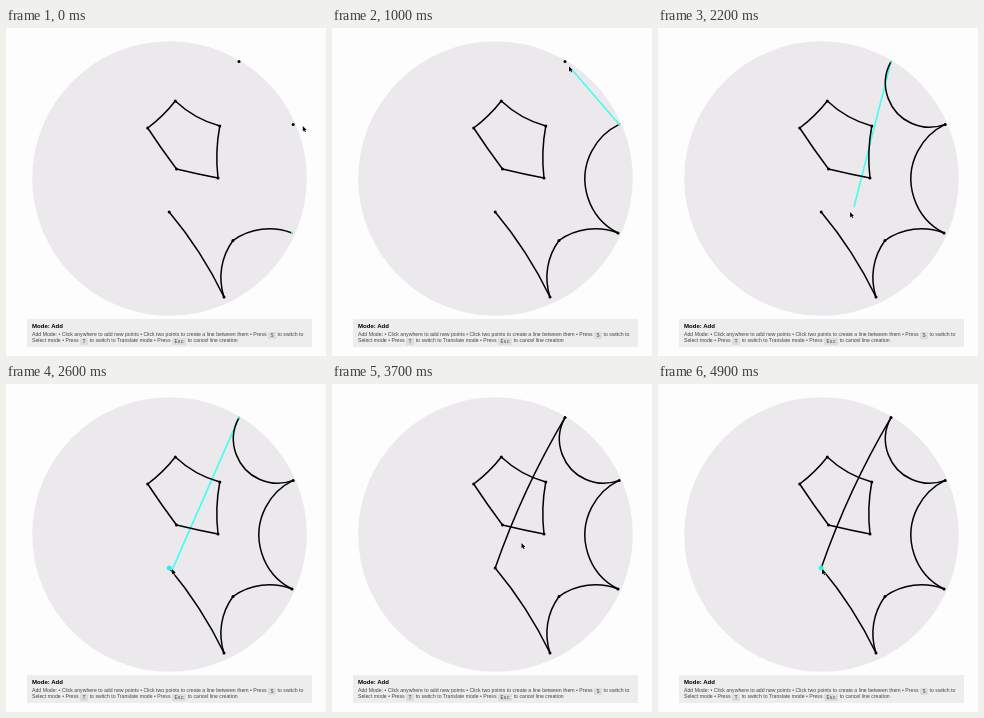
Write an HTML page with a canvas that moves like this. It is 320 px wide and 328 px high and loops after 5 s.

```html
<!DOCTYPE html>
<html lang="en">
<head>
<meta charset="utf-8">
<title>Hyperbolic line editor</title>
<style>
  html, body { margin: 0; width: 100%; height: 100%; overflow: hidden; background: #fdfdfd; }
  canvas { position: absolute; left: 0; top: 0; }
  #panel { position: absolute; left: 20.5px; top: 291px; width: 285.5px; height: 28px; background: #ededed;
    font: 5.18px/6.2px "Liberation Sans", Arial, sans-serif; color: #444; white-space: nowrap; }
  #panel * { margin: 0; }
  h1 { position: absolute; left: 5.5px; top: 4px; font-size: 6.05px; line-height: 7px; color: #000; }
  p { position: absolute; left: 5.5px; top: 12px; }
  kbd { font: 5.18px/0 "Liberation Mono", monospace; padding: .5px 2.5px; border-radius: 1px; background: #dcdcdc; }
</style>
</head>
<body>
<canvas id="stage" width="320" height="328"></canvas>
<div id="panel">
  <h1>Mode: Add</h1>
  <p>Add Mode: • Click anywhere to add new points • Click two points to create a line between them • Press <kbd>S</kbd> to switch to<br>Select mode • Press <kbd>T</kbd> to switch to Translate mode • Press <kbd>Esc</kbd> to cancel line creation</p>
</div>
<script>
const ctx = document.getElementById('stage').getContext('2d');
const LOOP = 5000, STEP = 100, LAG = 40, HOVER = 4.5;
const center = [163.5, 150.5], R = 137.3;

const pentagon = [[169.3, 73], [213.8, 98], [212, 150], [170.5, 141], [141.7, 100]];
const chain = [[163.2, 184], [218, 269], [227, 212.5], [286, 205], [287.2, 96.4], [233, 33.6]];
const [A, B, C, D, E, F] = chain;
const points = [...pentagon, ...chain];

// Lines present from the start, and lines made by hand
const fixed = [...pentagon.map((p, i) => [p, pentagon[(i + 1) % 5]]), [A, B], [B, C], [C, D]];
const made = [
  { from: D, to: E, start: 0, done: 400 },
  { from: E, to: F, start: 600, done: 1300 },
  { from: F, to: A, start: 1600, done: 2900 }
];

// Eased pointer moves; "via" bends the way
const home = [296.8, 98];
const moves = [
  { start: 0, end: 400, to: E },
  { start: 500, end: 1100, to: F },
  { start: 1600, end: 2600, to: [166, 185], via: [205, 224] },
  { start: 3600, end: 3800, to: [213, 133] },
  { start: 4000, end: 4300, to: [164, 179] },
  { start: 4400, end: 4900, to: [164, 185] }
];

const mix = (p, q, u) => p.map((v, i) => v + (q[i] - v) * u);
const distance = (p, q) => Math.hypot(p[0] - q[0], p[1] - q[1]);

function pointerAt(t) {
  let pos = home;
  for (const { start, end, to, via } of moves) {
    if (t <= start) break;
    const u = Math.min(1, (t - start) / (end - start)), e = u * u * (3 - 2 * u);
    pos = via ? mix(mix(pos, via, e), mix(via, to, e), e) : mix(pos, to, e);
  }
  return pos;
}

function dot([x, y], r, color) {
  ctx.fillStyle = color;
  ctx.beginPath();
  ctx.arc(x, y, r, 0, 2 * Math.PI);
  ctx.fill();
}

// Arc through p and q that meets the disc's edge at right angles
function geodesic(p, q) {
  const [px, py] = mix(p, center, 0).map((v, i) => v - center[i]);
  const [qx, qy] = q.map((v, i) => v - center[i]);
  const a = (R * R + px * px + py * py) / 2, b = (R * R + qx * qx + qy * qy) / 2;
  const det = px * qy - py * qx;
  const x = (a * qy - b * py) / det, y = (b * px - a * qx) / det;
  const from = Math.atan2(py - y, px - x), to = Math.atan2(qy - y, qx - x);
  ctx.beginPath();
  ctx.arc(center[0] + x, center[1] + y, Math.sqrt(x * x + y * y - R * R), from, to, Math.sin(to - from) < 0);
  ctx.stroke();
}

function drawPointer([x, y]) {
  ctx.beginPath();
  [[0, 0], [0, 5.4], [1.3, 4.3], [2.2, 6.2], [3.1, 5.8], [2.3, 4], [3.9, 3.9]]
    .forEach(([dx, dy]) => ctx.lineTo(x + dx, y + dy));
  ctx.closePath();
  ctx.lineWidth = 0.8;
  ctx.strokeStyle = '#fff';
  ctx.stroke();
  ctx.fillStyle = '#000';
  ctx.fill();
}

function draw(t) {
  const tip = pointerAt(t), trail = pointerAt(t - LAG);
  const active = made.find(m => t >= m.start && t < m.done);
  ctx.clearRect(0, 0, 320, 328);
  dot(center, R, '#ebe9ec');
  ctx.lineCap = 'round';

  // The rubber band shows only while the pointer is inside the disc
  if (active && distance(trail, center) < R) {
    ctx.lineWidth = 1.6;
    ctx.strokeStyle = '#3ffff2';
    ctx.beginPath();
    ctx.moveTo(...active.from);
    ctx.lineTo(...trail);
    ctx.stroke();
  }

  ctx.lineWidth = 1.5;
  ctx.strokeStyle = '#000';
  for (const [p, q] of fixed) geodesic(p, q);
  for (const { from, to, done } of made) if (t >= done) geodesic(from, to);

  for (const p of points) {
    if (distance(p, tip) < HOVER) dot(p, 2.5, '#1ff5f0');
    else if (active && active.from === p) dot(p, 1.2, '#4fe8c8');
    else dot(p, 1.5, '#000');
  }
  drawPointer(tip);
}

const begin = performance.now();
function frame() {
  const t = (performance.now() - begin) % LOOP;
  draw(Math.floor(t / STEP) * STEP);
  requestAnimationFrame(frame);
}
frame();
</script>
</body>
</html>
```
